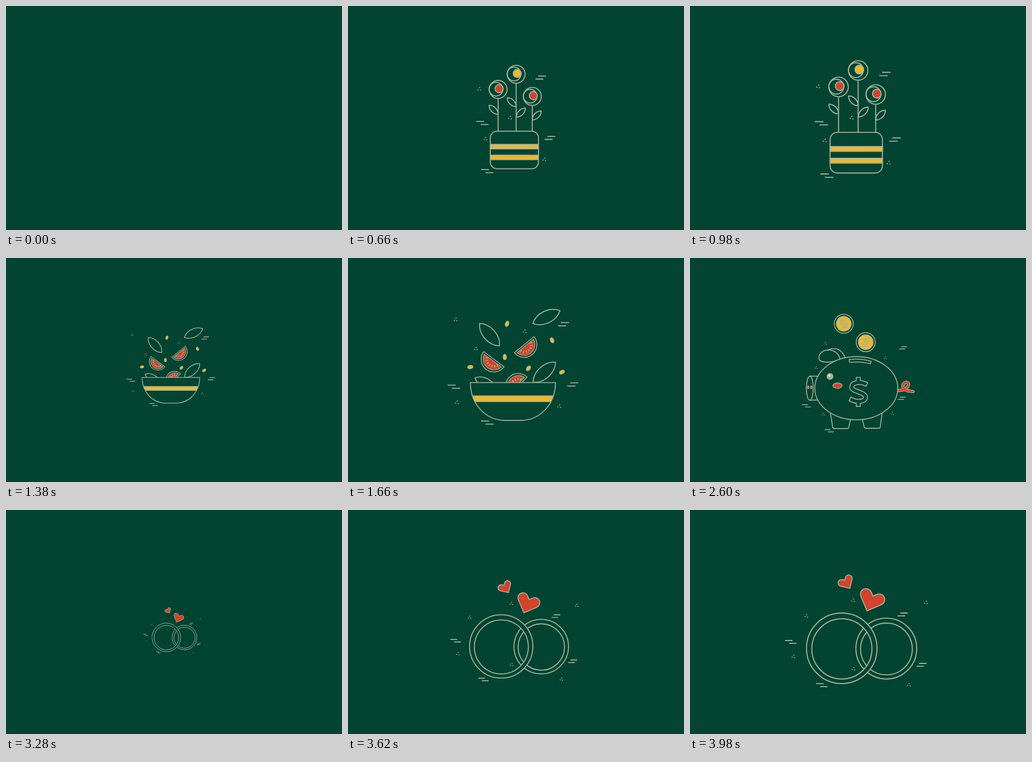
Write an HTML page with a canvas that moves like this. It is 600x400 px and loops after 4000 ms.

```html
<!DOCTYPE html>
<html lang="en">
<head>
<meta charset="utf-8">
<title>Line icons</title>
<style>
html, body { margin: 0; width: 100%; height: 100%; overflow: hidden; background: #024332; }
canvas { display: block; width: 600px; height: 400px; }
</style>
</head>
<body>
<canvas id="stage" width="600" height="400"></canvas>
<script>
const ctx = document.getElementById('stage').getContext('2d');
const BG = '#024332', LINE = '#a0b296', YELLOW = '#edb72f', RED = '#d4432b';
const TAU = Math.PI * 2, DEG = Math.PI / 180;
let swell = 1;

// Lines thin out a little less than the shapes shrink
const pen = w => { ctx.lineWidth = w * swell; };

function paint(path, fill, stroke = LINE) {
  if (fill) { ctx.fillStyle = fill; ctx.fill(path); }
  if (stroke) { ctx.strokeStyle = stroke; ctx.stroke(path); }
}
const shape = (d, fill) => paint(new Path2D(d), fill);

function oval(x, y, rx, ry = rx, fill = null, turn = 0, stroke = LINE) {
  const p = new Path2D();
  p.ellipse(x, y, rx, ry, turn * DEG, 0, TAU);
  paint(p, fill, stroke);
}

function placed(x, y, turn, size, draw) {
  ctx.save();
  ctx.translate(x, y);
  ctx.rotate(turn * DEG);
  ctx.scale(size, size);
  draw();
  ctx.restore();
}

function clipped(path, draw) {
  ctx.save();
  ctx.clip(path);
  draw();
  ctx.restore();
}

// Leaf between two tips, bulging equally to both sides
function leaf(x, y, dx, dy) {
  const b = .27, at = (t, side) => `${x + dx * t - dy * b * side} ${y + dy * t + dx * b * side}`;
  shape(`M${x} ${y}C${at(.25, 1)} ${at(.75, 1)} ${x + dx} ${y + dy}` +
    `C${at(.75, -1)} ${at(.25, -1)} ${x} ${y}Z`);
}

// Two short lines; the lower one slips towards the middle
function dashes(size, ...spots) {
  const len = 15.3 * size;
  for (const [x, y] of spots)
    shape(`M${x} ${y}h${len}M${x + (x > 300 ? -5.3 : 8.3) * size} ${y + 5.9 * size}h${len}`);
}

// Three dots in a triangle
function sparks(size, ...spots) {
  for (const [x, y] of spots)
    for (let i = 0; i < 3; i++) {
      const a = i * TAU / 3 - 1.4, r = 2.9 * size;
      oval(x + Math.cos(a) * r, y + Math.sin(a) * r, 1.15 * size, 1.15 * size, LINE, 0, null);
    }
}

// Two strokes of different width leave an outline
function tube(path, outer, inner, fill, cap) {
  ctx.save();
  ctx.lineCap = cap;
  ctx.lineWidth = outer;
  paint(path, null, LINE);
  ctx.lineWidth = inner;
  paint(path, null, fill);
  ctx.restore();
}

const dollar = new Path2D(
  'M12 -14.5C6 -17.2 -1 -17.2 -5 -15.8C-13 -13.5 -14 -6 -7 -2.8' +
  'C-3 -1 3 .8 7 2.8C15.5 7 14.5 14.5 6 16.4C0 17.6 -6 17 -11.5 14.2M0 -22.2V-17M0 17V22.2');

function flower(x, y, leafY, side, fill) {
  shape(`M${x} ${y + 17.5}V225`);
  oval(x, y, 17.4);
  oval(x - 4, y - .5, 13.3);
  oval(x + 2, y - 1.5, 7.8, 7.8, fill);
  leaf(x, leafY, 17.3 * side, -17.2);
}

function plant() {
  pen(1.9);
  flower(300.3, 115, 177.8, -1, YELLOW);
  flower(265.3, 144.5, 192.6, -1, RED);
  flower(331.6, 158, 203.5, 1, RED);
  leaf(300.8, 198, 17.3, -17.2);
  for (const y of [251, 272]) shape(`M250.3 ${y}H343.6V${y + 8.6}H250.3Z`, YELLOW);
  const pot = new Path2D();
  pot.roundRect(250.2, 225.6, 93.4, 72.6, 13);
  paint(pot);
  dashes(1, [343, 118.5], [223, 206.5], [361, 235.5], [232.5, 300]);
  sparks(1, [229, 144], [288.7, 199.8], [241, 240.5], [355, 280.5]);
}

function melon(x, y, turn) {
  placed(x, y, turn, 1, () => {
    pen(1.5);
    shape('M-22.7 0H22.7A22.7 22.7 0 0 1 -22.7 0Z');
    pen(1.2);
    shape('M-19 3H19A19.3 19.3 0 0 1 -19 3Z', RED);
    pen(1.7);
    for (let i = 0; i < 7; i++) {
      const a = (24 + i * 22) * DEG, c = Math.cos(a), s = Math.sin(a);
      shape(`M${c * 10.5} ${s * 10.5}L${c * 15} ${s * 15}`);
    }
  });
}

function bowl() {
  const body = new Path2D('M218.6 222.5H370.4C370.4 261 343 290 308 290H281C246 290 218.6 261 218.6 222.5Z');
  pen(1.7);
  leaf(235, 117, 35.5, 40);
  leaf(330, 117, 48.5, -23);
  clipped(new Path2D('M100 50H500V222.5H100Z'), () => {
    leaf(330.5, 222, 40, -36);
    leaf(226.8, 214, 37, 18);
    melon(304, 229, 134);
  });
  melon(260.5, 180.8, 36.6);
  melon(314.6, 154.8, -39);
  pen(1.4);
  const seeds = [[364.4, 147], [280, 176.8], [284, 117.5], [322.2, 197], [382, 203.8], [218.4, 194.7]];
  seeds.forEach(([x, y], i) => oval(x, y, 3, 4.8, YELLOW, i * 21 - 23));
  pen(1.7);
  clipped(body, () => shape('M210 246.2H380V256.4H210Z', YELLOW));
  paint(body);
  dashes(.96, [380, 115.5], [177.7, 227], [396.5, 223], [237.5, 291]);
  sparks(.92, [192.4, 110.5], [315.7, 131.3], [228.4, 162.3], [194.7, 258], [377.4, 265]);
}

function coin(x, y, turn) {
  pen(1.5);
  oval(x, y, 17);
  oval(x, y, 13.2, 13.2, YELLOW);
  placed(x, y, turn, .33, () => tube(dollar, 10.5, 3, YELLOW, 'square'));
}

function pig() {
  pen(1.6);
  shape('M250.8 277L254.9 302Q255.3 304.5 257.8 304.5H280.8Q282.8 304.5 283.3 302.5L286.8 288');
  shape('M343 277L339.6 302Q339.2 304 337.2 304H313.7Q311.7 304 311.2 302L307.7 288');
  shape('M246 165.5C250 161 261 160.5 267 164.5C272 168 275 173 277 178');
  shape('M258 184.3C250 186.2 234.5 187.5 230.8 181.5C228 170.5 238 163.8 249 164.2C261 165.5 265.5 172 268 180');
  shape('M214 211H229M214 254L228.5 253.3');
  oval(214, 232.6, 6.1, 21.5, BG);
  tube(new Path2D('M371 236.5C381 237.5 391 231 390.3 224.5C388.3 219.5 380 222 379.8 229C380.3 236 390 238 398.3 238.4'),
    5.6, 3.2, RED, 'round');
  oval(297, 232.5, 74, 56.4, BG);
  pen(1.2);
  for (const x of [211.2, 216.5]) oval(x, 230.8, 1.4, 2.5, RED);
  oval(250, 211.5, 6, 6, LINE, 0, null);
  oval(249, 210, 1.9, 1.9, '#f4f4ea', 0, null);
  pen(1.5);
  oval(263.4, 228, 8.2, 4.7, RED);
  shape('M284 181.3C298 179.5 312 181 323.5 184.4L322.2 189C311 186 298 185 285 186.2Z');
  placed(300.5, 239, 0, 1, () => tube(dollar, 8.8, 5.6, BG, 'square'));
  coin(274.6, 117.6, -35);
  coin(313.8, 150.4, 28);
  pen(1.4);
  dashes(.69, [377, 158.5], [374.9, 248.4], [200, 262], [240.6, 306.4]);
  sparks(.72, [241.8, 152.8], [349, 178.7], [225.3, 196.2], [238.1, 279.2], [361.3, 277.7]);
}

function heart(x, y, turn, size) {
  placed(x, y, turn, size, () => {
    pen(1.8 / size);
    shape('M0 0H28A10 10 0 0 1 28 20H20V28A10 10 0 0 1 0 28Z', RED);
  });
}

function rings() {
  pen(1.9);
  oval(350.6, 247.4, 54.3);
  oval(350.8, 248.2, 46.2);
  const band = new Path2D();
  band.arc(271, 247, 63, 0, TAU);
  band.closePath();
  band.moveTo(324.9, 248);
  band.arc(271.2, 248, 53.7, 0, TAU, true);
  paint(band, BG);
  heart(316, 180, -113, 1);
  heart(285.5, 139.8, -167, .6);
  pen(1.8);
  dashes(.87, [375.5, 184], [169.8, 233], [409, 274], [225.3, 310.2]);
  sparks(.92, [291.2, 161.8], [421.5, 165.6], [207.9, 189.4], [184.9, 262], [292.1, 283.8], [391, 312.5]);
}

// Bezier ease (.32, 0, .2, 1), solved by bisection
function ease(x) {
  let lo = 0, hi = 1;
  for (let i = 0; i < 30; i++) {
    const s = (lo + hi) / 2, r = 1 - s;
    if (.96 * s * r * r + .6 * s * s * r + s * s * s < x) lo = s; else hi = s;
  }
  return lo * lo * (3 - 2 * lo);
}

// size: growth at which the coordinates above are given
const scenes = [
  { draw: plant, x: 300, y: 201.5, size: 1 },
  { draw: bowl, x: 294.5, y: 194, size: ease(.66) },
  { draw: pig, x: 300.5, y: 205.5, size: ease(.6) },
  { draw: rings, x: 296.8, y: 214.2, size: 1 }
];

function render(ms) {
  const t = ms % 4000, scene = scenes[Math.floor(t / 1000)];
  ctx.fillStyle = BG;
  ctx.fillRect(0, 0, 600, 400);
  const k = ease(t % 1000 / 1000) / scene.size;
  if (k < .001) return;
  swell = 1 + .4 * Math.max(0, 1 - k);
  placed(scene.x, scene.y, 0, k, () => {
    ctx.translate(-scene.x, -scene.y);
    scene.draw();
  });
}

const start = performance.now();
function tick() {
  render(performance.now() - start);
  requestAnimationFrame(tick);
}
render(0);
requestAnimationFrame(tick);
</script>
</body>
</html>
```
